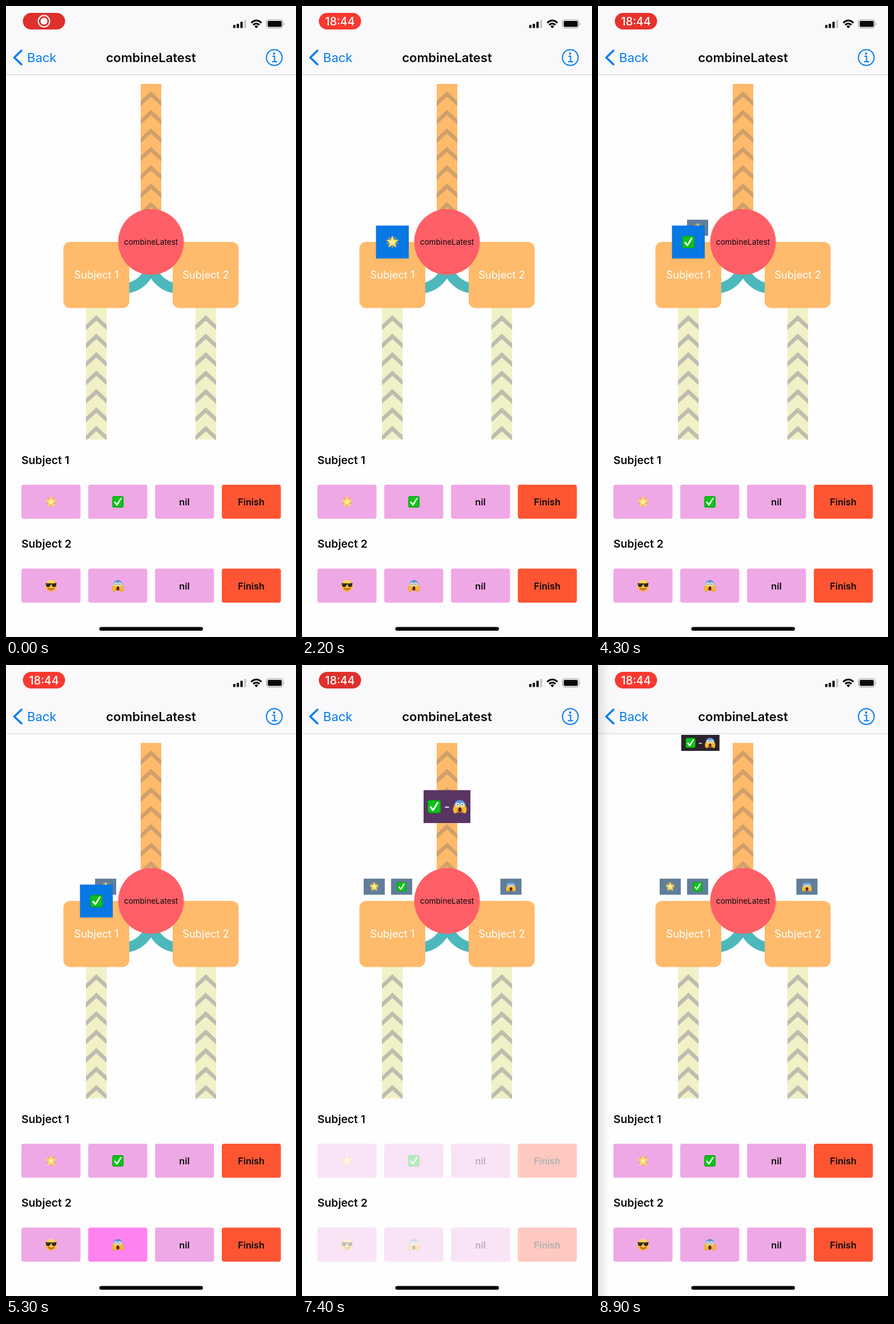
Write an HTML page that moves like this. It is 508x1102 px and loops after 9 s.

```html
<!DOCTYPE html>
<html lang="en">
<head>
<meta charset="utf-8">
<title>combineLatest</title>
<style>
  html, body { margin: 0; width: 100%; height: 100%; overflow: hidden; background: #fefdff; }
  svg { display: block; width: 508px; height: 1102px; font-family: Inter, Roboto, sans-serif; }
</style>
</head>
<body>
<svg id="stage" viewBox="0 0 508 1102" xmlns="http://www.w3.org/2000/svg">
  <defs>
    <linearGradient id="edge">
      <stop offset="0" stop-color="#000" stop-opacity=".1"/>
      <stop offset="1" stop-color="#000" stop-opacity="0"/>
    </linearGradient>
    <linearGradient id="skin" x1="0" y1="0" x2="0" y2="1">
      <stop offset="0" stop-color="#ffe15a"/>
      <stop offset="1" stop-color="#f5a31c"/>
    </linearGradient>
    <linearGradient id="fear" x1="0" y1="0" x2="0" y2="1">
      <stop offset="0" stop-color="#4a83d6"/>
      <stop offset=".3" stop-color="#86b0d8"/>
      <stop offset=".55" stop-color="#f8d25a"/>
      <stop offset="1" stop-color="#f3a42c"/>
    </linearGradient>
    <!-- icons are drawn around 0,0 in a 24 unit box -->
    <g id="star">
      <path id="rays" fill="#f3a23c"/>
      <path id="points" fill="#fddc62" stroke="#f8cf52" stroke-width="1.4" stroke-linejoin="round"/>
      <path id="shine" fill="#fff0a4"/>
    </g>
    <g id="check">
      <rect x="-11.5" y="-11.5" width="23" height="23" rx="3.5" fill="#05a70c"/>
      <rect x="-10" y="-10" width="20" height="20" rx="2.5" fill="#0fc21b"/>
      <path d="M-6 1L-2 6.2L6.2-6.8" fill="none" stroke="#fff" stroke-width="3" stroke-linecap="round" stroke-linejoin="round"/>
    </g>
    <g id="cool">
      <circle r="11.5" fill="url(#skin)"/>
      <path d="M-11-5.5Q0-4 11-5.5L10.6-2Q10 2.5 5.6 2.5Q1.8 2.3 1-2.6H-1Q-1.8 2.3-5.6 2.5Q-10 2.5-10.6-2Z" fill="#26221f"/>
      <path d="M-9-3.6L-5-3.4M2.5-3.4L6.5-3.6" stroke="#8a8783" stroke-width="1"/>
      <path d="M-5.5 5.2Q0 9.6 5.5 5.2" fill="none" stroke="#7a4310" stroke-width="1.5" stroke-linecap="round"/>
    </g>
    <g id="scream">
      <ellipse cy="-.5" rx="10.3" ry="11.2" fill="url(#fear)"/>
      <circle cx="-4" cy="-3.4" r="2.9" fill="#fff"/>
      <circle cx="4" cy="-3.4" r="2.9" fill="#fff"/>
      <circle cx="-4" cy="-3.2" r="1.2" fill="#3a261c"/>
      <circle cx="4" cy="-3.2" r="1.2" fill="#3a261c"/>
      <ellipse cy="5.6" rx="3.1" ry="4.4" fill="#5b2a12"/>
      <path id="hand" d="M-11.6 1.5Q-9.5-.8-8.2 2L-5.2 3.2Q-4 5-5 8L-6 11.5H-10Q-12.4 7-11.6 1.5Z" fill="#f6bd3b" stroke="#d98a1d" stroke-width=".8"/>
      <use href="#hand" transform="scale(-1 1)"/>
    </g>
  </defs>

  <rect width="508" height="1102" fill="#fefdff"/>
  <rect width="508" height="120" fill="#f9f8fb"/>
  <path d="M0 120H508" stroke="#cfced2"/>

  <rect id="pill" x="29.500" y="12" width="74" height="29" rx="14.500"/>
  <g id="rec" fill="none" stroke="#fff" stroke-width="2">
    <circle cx="66.500" cy="26.500" r="10"/>
    <circle cx="66.500" cy="26.500" r="6" fill="#fff" stroke="none"/>
  </g>
  <text id="clock" x="66.500" y="33.500" font-size="19.500" font-weight="500" fill="#fff" text-anchor="middle">18:44</text>

  <g fill="#0a0a0a">
    <rect x="398" y="33" width="4" height="5.500" rx="1"/>
    <rect x="404" y="31" width="4.200" height="7.500" rx="1"/>
    <rect x="410.500" y="27.500" width="4.200" height="11" rx="1"/>
    <rect x="417" y="24" width="4" height="14.500" rx="1" fill="#cbcacd"/>
    <rect x="458.500" y="26" width="24.500" height="10.500" rx="2"/>
    <path d="M486.800 29.500Q489 31.300 486.800 33.500Z" fill="#a5a4a7"/>
  </g>
  <rect x="456.500" y="24" width="28.500" height="14.500" rx="4" fill="none" stroke="#98979b" stroke-width="1.200"/>
  <g fill="none" stroke="#0a0a0a" stroke-width="3">
    <path d="M429.500 29.300Q438.500 21.300 447.500 29.300"/>
    <path d="M433 33Q438.500 28.200 444 33"/>
  </g>
  <path d="M435.200 35.500Q438.500 32.600 441.800 35.500L438.500 39Z" fill="#0a0a0a"/>

  <path d="M27 78L14.500 90L27 102" fill="none" stroke="#087cee" stroke-width="3.600" stroke-linecap="round" stroke-linejoin="round"/>
  <text x="37" y="98" font-size="22" fill="#087cee">Back</text>
  <text x="254" y="98" font-size="22" font-weight="600" fill="#0a0a0a" text-anchor="middle">combineLatest</text>
  <circle cx="470" cy="90" r="13.800" fill="none" stroke="#087cee" stroke-width="2"/>
  <circle cx="469.700" cy="83" r="1.900" fill="#087cee"/>
  <path d="M466.500 87.800H470.500V97M466 97.200H475" fill="none" stroke="#087cee" stroke-width="2"/>

  <g id="lanes"></g>
  <g fill="none" stroke="#4db8bb" stroke-width="18">
    <path d="M254 445A48 48 0 0 1 206 493"/>
    <path d="M254 445A48 48 0 0 0 302 493"/>
  </g>
  <g fill="#ffbb6b">
    <rect x="100.500" y="412" width="115.500" height="115.500" rx="12"/>
    <rect x="292" y="412" width="115.500" height="115.500" rx="12"/>
  </g>
  <g font-size="18.300" fill="#fff" text-anchor="middle">
    <text x="158.500" y="476">Subject 1</text>
    <text x="350" y="476">Subject 2</text>
  </g>
  <circle cx="254" cy="412" r="57.500" fill="#ff6067"/>
  <text x="254" y="417" font-size="13.600" fill="#0a0a0a" text-anchor="middle">combineLatest</text>

  <g font-size="19.300" font-weight="600" fill="#0a0a0a">
    <text x="27" y="800">Subject 1</text>
    <text x="27" y="946">Subject 2</text>
  </g>
  <g id="buttons" font-size="16.200" font-weight="600" fill="#0a0a0a" text-anchor="middle"></g>
  <g id="tokens"></g>
  <rect x="163.500" y="1084.500" width="181.500" height="6.500" rx="3.250" fill="#050505"/>
  <rect id="shade" width="20" height="1102" fill="url(#edge)"/>
</svg>
<script>
const LOOP = 9000;
const $ = id => document.getElementById(id);

function add(parent, tag, attrs, text) {
  const el = document.createElementNS('http://www.w3.org/2000/svg', tag);
  set(el, attrs);
  if (text) el.textContent = text;
  parent.appendChild(el);
  return el;
}
function set(el, attrs) {
  for (const k in attrs) el.setAttribute(k, attrs[k]);
}

const clamp = v => Math.max(0, Math.min(1, v));
const mix = (a, b, p) => a + (b - a) * p;
const part = (t, from, len) => clamp((t - from) / len);
const ease = p => p < .5 ? 2 * p * p : 1 - 2 * (1 - p) * (1 - p);
const glide = (t, from, len) => ease(part(t, from, len));
const within = (t, [from, to]) => t >= from && t < to;
const blend = (a, b, p) => `rgb(${a.map((v, i) => Math.round(mix(v, b[i], p)))})`;

// star icon
function starPath(outer, inner) {
  let d = '';
  for (let i = 0; i < 10; i++) {
    const a = Math.PI * (i / 5 - .5), r = i % 2 ? inner : outer;
    d += (i ? 'L' : 'M') + (r * Math.cos(a)).toFixed(2) + ' ' + (r * Math.sin(a)).toFixed(2);
  }
  return d + 'Z';
}
function rayPath() {
  let d = '';
  for (let i = 0; i < 5; i++) {
    const a = Math.PI * (.4 * i - .3);
    const at = (r, o) => (r * Math.cos(a + o)).toFixed(2) + ' ' + (r * Math.sin(a + o)).toFixed(2);
    d += `M${at(6, 0)}L${at(10.5, -.15)}L${at(10.5, .15)}Z`;
  }
  return d;
}
set($('points'), { d: starPath(11, 5) });
set($('shine'), { d: starPath(6.5, 3) });
set($('rays'), { d: rayPath() });

// conveyor lanes
function lane(x, top, bottom, fill, mark) {
  const g = add($('lanes'), 'svg', { x, y: top, width: 36.5, height: bottom - top });
  add(g, 'rect', { width: 36.5, height: bottom - top, fill });
  for (let y = 13; y < bottom - top; y += 32.2)
    add(g, 'path', { d: `M0 ${y + 17}L18.250 ${y}L36.500 ${y + 17}V${y + 26}L18.250 ${y + 9.5}L0 ${y + 26}Z`, fill: mark });
}
lane(235.7, 136, 412, '#ffbb6b', '#d0a06b');
lane(140, 527, 757.5, '#f0f1c6', '#bebdae');
lane(331.7, 527, 757.5, '#f0f1c6', '#bebdae');

// buttons
const PINK = '#efa8e6', PRESSED = '#ff82f0';
const keys = {};
[['star', 'check'], ['cool', 'scream']].forEach((icons, row) => {
  const y = 836 + row * 146.5;
  [...icons, 'nil', 'Finish'].forEach((name, col) => {
    const x = 27 + col * 117;
    const box = add($('buttons'), 'rect', { x, y, width: 103.5, height: 59.5, rx: 4, fill: col === 3 ? '#ff5533' : PINK });
    if (col < 2) {
      add($('buttons'), 'use', { href: '#' + name, transform: `translate(${x + 52} ${y + 30}) scale(.86)` });
      keys[name] = box;
    } else add($('buttons'), 'text', { x: x + 51.5, y: y + 36 }, name);
  });
});

// tokens: each rises along its lane, then shrinks into the row of past values
const BLUE = [8, 120, 228], PAST = [96, 126, 155], PLUM = [88, 53, 99], DARK = [43, 34, 44];
const RISE = 1000, SHRINK = 400, JOIN = 6850;
const tokens = [
  { icon: 'star', x: 158.3, start: 900, past: 2700, shift: JOIN },
  { icon: 'check', x: 158.3, start: 3050, past: JOIN },
  { icon: 'scream', x: 349.8, start: 5850, past: JOIN }
];
for (const k of tokens) {
  k.g = add($('tokens'), 'g', {});
  k.box = add(k.g, 'rect', {});
  k.face = add(k.g, 'use', { href: '#' + k.icon });
}
const pair = add($('tokens'), 'g', {});
const pairBox = add(pair, 'rect', {});
const pairFace = add(pair, 'g', {});
add(pairFace, 'use', { href: '#check', x: -22.5 });
add(pairFace, 'use', { href: '#scream', x: 22.5 });
add(pairFace, 'path', { d: 'M-3.500 1H3.500', stroke: '#fff', 'stroke-width': 1.8 });

function place(g, box, x, y, w, h, fill) {
  set(g, { transform: `translate(${x} ${y})` });
  set(box, { x: -w / 2, y: -h / 2, width: w, height: h, fill });
}

const presses = { star: [400, 650], check: [2500, 2800], scream: [5200, 5600] };
const busy = [[650, 2000], [2800, 4150], [5600, 8300]];

function render(t) {
  const pulse = .5 - .5 * Math.cos(t / 3600 * 2 * Math.PI);
  set($('pill'), { fill: blend([222, 48, 44], [250, 58, 48], pulse) });
  const icon = t < 800;
  set($('rec'), { opacity: icon ? 1 : 0 });
  set($('clock'), { opacity: icon ? 0 : 1 });

  let dim = 0;
  for (const [from, to] of busy) dim = Math.max(dim, part(t, from, 150) - part(t, to, 150));
  set($('buttons'), { opacity: 1 - .7 * dim });
  for (const name in presses) set(keys[name], { fill: within(t, presses[name]) ? PRESSED : PINK });

  for (const k of tokens) {
    const up = glide(t, k.start, RISE), p = glide(t, k.past, SHRINK);
    const moved = k.shift ? glide(t, k.shift, SHRINK) : 0;
    place(k.g, k.box, k.x + 16.2 * p - 48 * moved, mix(mix(757, 412.2, up), 387.2, p),
      mix(57.5, 37, p), mix(57.5, 28, p), blend(BLUE, PAST, p));
    set(k.g, { opacity: part(t, k.start, 100) });
    set(k.face, { transform: `scale(${mix(.94, .72, p)})` });
  }

  const up = glide(t, JOIN, RISE), p = glide(t, JOIN + RISE, SHRINK);
  place(pair, pairBox, mix(254, 179.3, p), mix(412, 136, up), mix(82, 67, p), mix(57.5, 28, p), blend(PLUM, DARK, p));
  set(pair, { opacity: part(t, JOIN, 100) });
  set(pairFace, { transform: `scale(${mix(1, .76, p)})` });

  set($('shade'), { opacity: part(t, 8750, 100) });
}

function tick(now) {
  render(now % LOOP);
  requestAnimationFrame(tick);
}
render(0);
requestAnimationFrame(tick);
</script>
</body>
</html>
```
